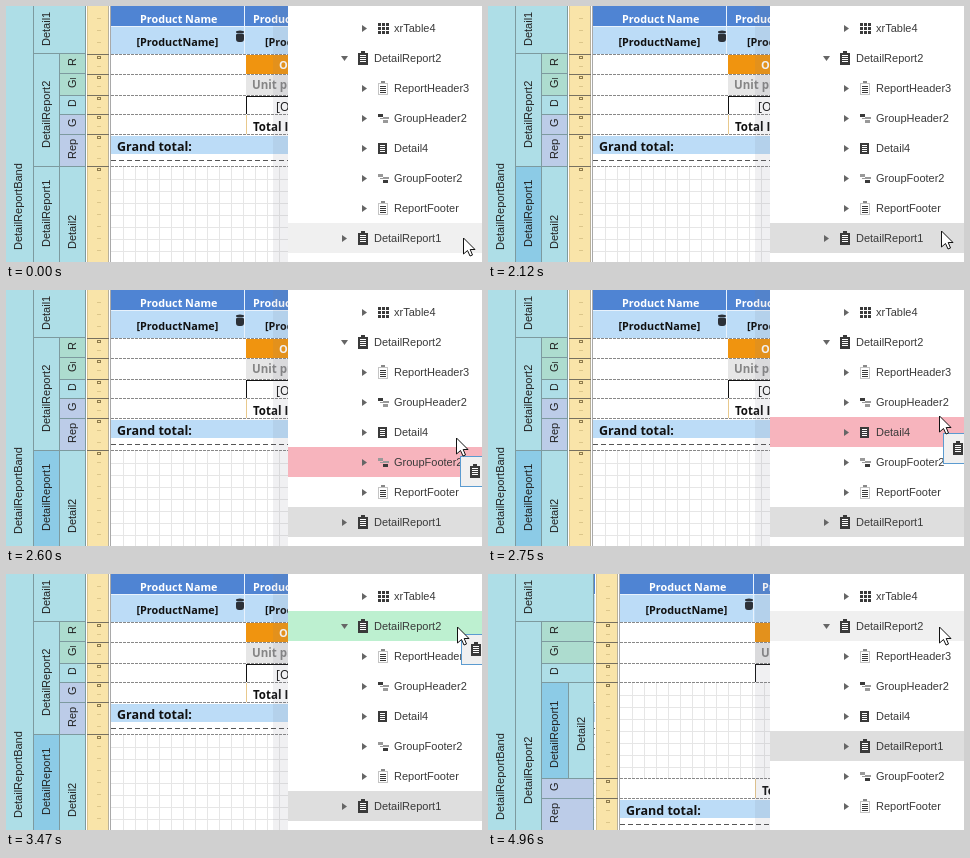
An HTML page with a canvas for the animation above (5.62 s loop, 476 by 256 pixels).

```html
<!DOCTYPE html>
<html lang="en">
<head>
<meta charset="utf-8">
<title>Moving a detail report band</title>
<style>
html, body { margin: 0; width: 476px; height: 256px; overflow: hidden; background: #fff; }
canvas { display: block; }
</style>
</head>
<body>
<canvas id="stage" width="476" height="256"></canvas>
<script>
const ctx = document.getElementById('stage').getContext('2d');
const LOOP = 5620, STEP = 30, DRAG = 2120, DROP = 4530;
const SANS = '11px "Liberation Sans", Arial, sans-serif';
const bold = size => `bold ${size}px "Open Sans", "Noto Sans", sans-serif`;
const C = {
  band: '#aedee7', picked: '#8ccbe6', green: '#addccf', lilac: '#bccce8',
  edge: '#7d9a9f', ruler: '#f9e4a9', blue: '#4f84d3', pale: '#bcdcf7',
  ink: '#3a3a3a', selected: '#dedede', hover: '#f0f0f0', pink: '#f7b4bd', mint: '#bdf0d0'
};

// time, x, y
const cursorPath = [[0, 457, 231], [2119, 457, 231], [2120, 453, 224], [2600, 450, 147],
  [2660, 450, 138], [3020, 454, 87], [3230, 452, 63], [3470, 451, 52]];
// time, left, middle
const ghostPath = [[2270, 457, 234], [2600, 455, 181], [2660, 455, 171], [3020, 460, 120],
  [3230, 458, 94], [3260, 457, 89], [3470, 456, 75]];

function along(path, t) {
  const last = path[path.length - 1];
  if (t >= last[0]) return last.slice(1);
  const i = Math.max(1, path.findIndex(p => p[0] > t));
  const a = path[i - 1], b = path[i];
  const k = Math.max(0, (t - a[0]) / (b[0] - a[0]));
  return [1, 2].map(n => Math.round(a[n] + (b[n] - a[n]) * k));
}

function box(x, y, w, h, color) {
  ctx.fillStyle = color;
  ctx.fillRect(x, y, w, h);
}

function text(str, x, y, font, color) {
  ctx.font = font;
  ctx.fillStyle = color;
  ctx.fillText(str, x, y);
}

function dash(x, y, w, color, on, off) {
  for (let i = 0; i < w; i += on + off) box(x + i, y, Math.min(on, w - i), 1, color);
}

// The label reads upwards from start and is cut off near the top of the band.
function band(name, x, y, w, h, color, start = y + h - 8) {
  box(x, y, w, h, color);
  box(x + w - 1, y, 1, h, C.edge);
  box(x, y + h - 1, w, 1, C.edge);
  ctx.save();
  ctx.beginPath();
  ctx.rect(x, y + 4, w, h - 4);
  ctx.clip();
  ctx.translate(x + 16, start);
  ctx.rotate(-Math.PI / 2);
  text(name, 0, 0, SANS, '#222');
  ctx.restore();
}

function drawBands(moved, picked) {
  const w = moved ? 52 : 26, dy = moved ? 96 : 0;
  const chosen = picked ? C.picked : C.band;
  band('DetailReportBand', 0, -1, 28, 259, C.band, moved ? 246 : 244);
  band('Detail1', 28, -1, 26 + w, 49, C.band);
  band('DetailReport2', 28, 48, 26, 113 + dy, C.band, moved ? 230 : 142);
  band('ReportHeader3', 54, 48, w, 20, C.green);
  band('GroupHeader2', 54, 68, w, 22, C.green);
  band('Detail4', 54, 90, w, 19, C.band);
  band('GroupFooter2', 54, 109 + dy, w, 20, C.lilac);
  band('ReportFooter', 54, 129 + dy, w, 32, C.lilac);
  if (moved) {
    band('DetailReport1', 54, 109, 27, 96, chosen, 194);
    band('Detail2', 81, 109, 25, 96, C.band, 177);
  } else {
    band('DetailReport1', 28, 161, 26, 97, chosen, 241);
    band('Detail2', 54, 161, 26, 97, C.band, 243);
  }
}

function drawRuler(x, edges) {
  box(x - 1, 0, 24, 256, '#fff');
  box(x, 0, 22, 256, C.ruler);
  box(x, 0, 1, 256, '#d8c48f');
  box(x + 21, 0, 1, 256, '#b8b09a');
  edges.forEach((y, i) => {
    const end = edges[i + 1] || 257;
    for (let k = y + 12; k < end - 2; k += 12) box(x + 10, k, 4, 1, '#dcc68a');
    if (!y) return;
    box(x, y, 22, 1, '#77705f');
    ctx.strokeStyle = '#8d7a4c';
    ctx.lineWidth = 1;
    ctx.strokeRect(x + 10.5, y + 2.5, 3, 2);
  });
}

function drawGrid(x, y, h) {
  for (let i = x + 12; i < 282; i += 12) box(i, y, 1, h, '#e6e6e6');
  for (let j = y + 12; j < y + h; j += 12) box(x, j, 282 - x, 1, '#e6e6e6');
}

function drawSurface(moved) {
  const dx = moved ? 27 : 0, dy = moved ? 96 : 0;
  const left = 105 + dx, col = 240 + dx, wide = 282 - left;
  const edges = [0, 48, 68, 89, 108, ...(moved ? [204] : []), 128 + dy, ...(moved ? [] : [160])];
  drawRuler(81 + dx, edges);
  box(left - 1, 0, wide + 1, 256, '#fff');

  box(left, 0, wide, 20, C.blue);
  box(left, 20, wide, 28, C.pale);
  box(left, 20, wide, 1, '#e8f2fc');
  box(col - 2, 0, 1, 48, '#e8f2fc');
  text('Product Name', 134 + dx, 17, bold(10.8), '#fff');
  text('Product Name', 247 + dx, 17, bold(10.8), '#fff');
  text('[ProductName]', 130.5 + dx, 40, bold(10.8), '#111');
  text('[ProductName]', 259 + dx, 40, bold(10.8), '#111');
  drawDatabase(230 + dx, 24);

  box(col, 49, 282 - col, 19, '#f0940f');
  text('Orders', 273 + dx, 63, bold(11), '#fff');
  box(col, 69, 282 - col, 20, '#e6e6e6');
  text('Unit price', 246 + dx, 83, bold(11.5), '#858585');
  box(col, 90, 282 - col, 1, '#111');
  box(col, 90, 1, 18, '#111');
  text('[Orders]', 270 + dx, 105, '12px "Open Sans", "Noto Sans", sans-serif', '#111');
  box(col, 109 + dy, 1, 19, '#e8c98d');
  text('Total Items', 247 + dx, 125 + dy, bold(11.5), '#111');

  box(left, 130 + dy, wide, 18, C.pale);
  text('Grand total:', 111 + dx, 145 + dy, bold(12.5), '#111');
  dash(left, 154 + dy, wide, '#555', 5, 3);
  if (moved) drawGrid(left, 109, 95);
  else drawGrid(left, 161, 95);

  edges.slice(1).forEach(y => dash(left, y, wide, '#888', 3, 1));
  box(left - 1, 0, 1, 256, '#a9a9a9');
  box(267, 0, 15, 256, 'rgba(120,115,140,.11)');
}

function drawDatabase(x, y) {
  ctx.fillStyle = '#2c3138';
  ctx.beginPath();
  ctx.ellipse(x + 4, y + 2, 4, 1.5, 0, 0, 7);
  ctx.roundRect(x, y + 4, 8, 8, [1, 1, 3, 3]);
  ctx.fill();
}

const icons = {
  table(x, y) {
    for (let i = 0; i < 9; i++) box(x - 5 + i % 3 * 4, y - 5 + (i / 3 | 0) * 4, 3, 3, C.ink);
  },
  report(x, y) {
    box(x - 5, y - 5, 10, 12, C.ink);
    box(x - 2, y - 7, 4, 2, C.ink);
    for (const j of [-3, -1, 1, 3]) box(x - 3, y + j, 6, 1, '#fff');
  },
  detail(x, y) {
    box(x - 5, y - 5, 9, 11, C.ink);
    for (const j of [-3, -1, 1, 3]) box(x - 3, y + j, 5, 1, '#fff');
  },
  edge(x, y) {
    ctx.strokeStyle = '#888';
    ctx.lineWidth = 1;
    ctx.setLineDash([1, 1]);
    ctx.strokeRect(x - 4.5, y - 4.5, 9, 11);
    ctx.setLineDash([]);
    box(x - 2, y - 7, 4, 2, '#888');
    for (const j of [-2, 0, 2, 4]) box(x - 3, y + j, 6, 1, C.ink);
  },
  head(x, y) { groupIcon(x, y, C.ink, '#999'); },
  foot(x, y) { groupIcon(x, y, '#999', C.ink); }
};

function groupIcon(x, y, top, low) {
  box(x - 5, y - 4, 5, 3, top);
  box(x - 3, y, 4, 1, '#999');
  box(x, y - 1, 6, 2, '#999');
  box(x, y + 2, 5, 3, low);
}

function arrow(x, y, open) {
  ctx.fillStyle = '#666';
  ctx.beginPath();
  if (open) { ctx.moveTo(x - 3, y - 2); ctx.lineTo(x + 4, y - 2); ctx.lineTo(x + .5, y + 3); }
  else { ctx.moveTo(x - 2, y - 3); ctx.lineTo(x - 2, y + 4); ctx.lineTo(x + 3, y + .5); }
  ctx.fill();
}

// name, icon, level
const rows = [['xrTable4', 'table', 2], ['DetailReport2', 'report', 1], ['ReportHeader3', 'edge', 2],
  ['GroupHeader2', 'head', 2], ['Detail4', 'detail', 2], ['GroupFooter2', 'foot', 2], ['ReportFooter', 'edge', 2]];
const tree = [...rows, ['DetailReport1', 'report', 1]];
const movedTree = [...rows.slice(0, 5), ['DetailReport1', 'report', 2], ...rows.slice(5)];

function drawTree(items, fills) {
  box(282, 0, 194, 256, '#fff');
  items.forEach(([name, icon, level], i) => {
    const y = 22 + i * 30, x = 317 + level * 20;
    if (fills[i]) box(282, y - 15, 194, 30, fills[i]);
    arrow(x + 1, y, name === 'DetailReport2');
    icons[icon](x + 20, y);
    text(name, x + 31, y + 4, SANS, C.ink);
  });
}

function drawGhost(x, mid) {
  box(x, mid - 15, 40, 30, '#f0f0f0');
  ctx.strokeStyle = '#5b9bd0';
  ctx.lineWidth = 1;
  ctx.strokeRect(x - .5, mid - 14.5, 40, 30);
  icons.report(x + 14, mid);
}

function drawCursor(x, y) {
  const pts = [[0, 0], [0, 16], [4, 12.5], [6.5, 18], [9, 17], [6.7, 11.5], [11.5, 11.5]];
  ctx.beginPath();
  pts.forEach(([a, b]) => ctx.lineTo(x + a + .5, y + b + 1));
  ctx.closePath();
  ctx.fillStyle = '#fff';
  ctx.fill();
  ctx.strokeStyle = '#111';
  ctx.lineWidth = 1;
  ctx.stroke();
}

function draw(time) {
  const t = time < DRAG ? time : DRAG + Math.floor((time - DRAG) / STEP + 1e-6) * STEP;
  const moved = time >= DROP, dragging = !moved && t >= ghostPath[0][0];
  const ghost = along(ghostPath, t);
  const fills = moved ? { 1: C.hover, 5: C.selected } : { 7: time < 890 ? C.hover : C.selected };
  if (dragging) {
    const over = Math.floor((ghost[1] - 23 - 7) / 30);
    if (over < 7) fills[over] = over === 1 ? C.mint : C.pink;
  }
  drawSurface(moved);
  drawBands(moved, time >= 990);
  drawTree(moved ? movedTree : tree, fills);
  if (dragging) drawGhost(...ghost);
  drawCursor(...along(cursorPath, t));
}

const begin = performance.now();
function tick() {
  draw((performance.now() - begin) % LOOP);
  requestAnimationFrame(tick);
}
tick();
</script>
</body>
</html>
```
